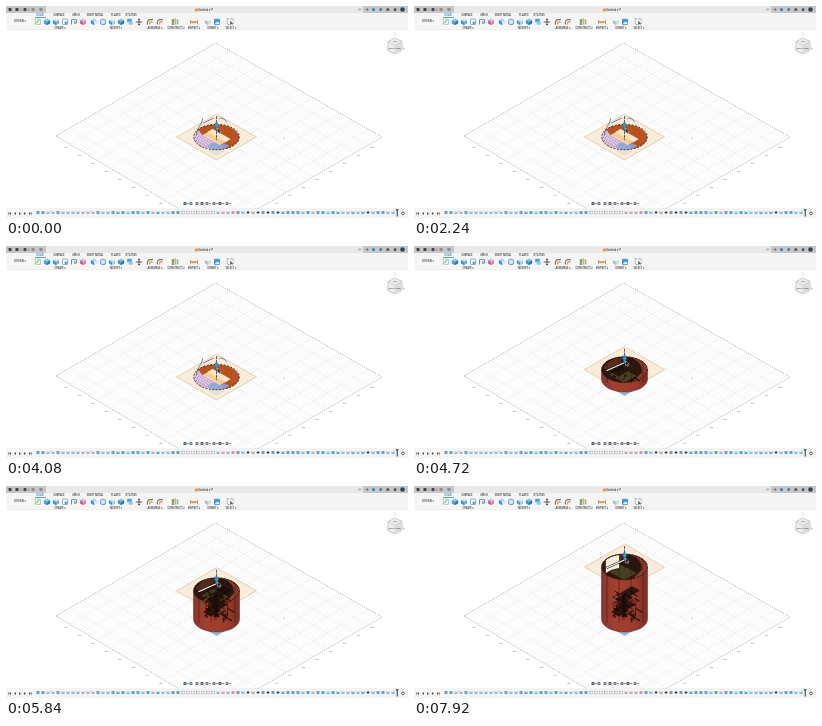
An HTML page that plays this animation: 402x212 px, repeating every 8 s.

```html
<!DOCTYPE html>
<html lang="en">
<head>
<meta charset="utf-8">
<title>Section view</title>
<style>
html, body { margin: 0; width: 100%; height: 100%; overflow: hidden; background: #fff; }
svg { display: block; width: 100vw; height: 100vh; }
text { font-family: "Open Sans", Inter, sans-serif; font-size: 2.6px; font-weight: 600; fill: #333; text-anchor: middle; }
#grid text { font-size: 2.2px; fill: #777; }
</style>
</head>
<body>
<svg id="stage" viewBox="0 0 402 212">
  <defs>
    <clipPath id="view"><rect y="24" width="402" height="179"/></clipPath>
    <clipPath id="shell"><path id="shellPath"/></clipPath>
    <clipPath id="disc"><ellipse rx="22.8" ry="12.8"/></clipPath>
    <linearGradient id="wall">
      <stop offset="0" stop-color="#87382e"/><stop offset=".3" stop-color="#a3402f"/>
      <stop offset=".72" stop-color="#9b3b2b"/><stop offset="1" stop-color="#7d2f25"/>
    </linearGradient>
    <pattern id="dots" width="2.4" height="2.4" patternUnits="userSpaceOnUse" patternTransform="rotate(30)">
      <rect width="2.4" height="2.4" fill="#e6cbe6"/><circle cx="1" cy="1" r=".6" fill="#8567a8"/>
    </pattern>
  </defs>
  <g id="grid" clip-path="url(#view)"></g>
  <g id="model">
    <path d="M203 145l7.5-4.3 7.5 4.3-7.5 4.4z" fill="#8fb5df" stroke="#5c8fca" stroke-width=".5"/>
    <path class="lift" d="M-40 0L0-23 40 0 0 23z" fill="#fbead4" fill-opacity=".82" stroke="#cfae7d" stroke-width=".5"/>
    <g id="body">
      <path id="side" fill="url(#wall)" stroke="#5c211b" stroke-width=".5"/>
      <g class="lift" clip-path="url(#disc)">
        <path d="M-23-14H23V14H-23z" fill="#2b1610"/>
        <path d="M-4-14C11-13 19-6 17 3L8 12 23 14V-14z" fill="#8b3a25"/>
        <path d="M-15 5L-3-2 12 6 0 13z" fill="#46401f"/>
        <path d="M-21-2C-17-9-9-12-3-12.5V-6L-15 1z" fill="#5a2a1a"/>
      </g>
      <g id="parts" clip-path="url(#shell)"></g>
      <path class="lift" id="slot" stroke="#2a1611" stroke-width=".7" fill="#fbeedd"/>
    </g>
    <g class="lift" id="floor">
      <g clip-path="url(#disc)">
        <path d="M-23-13H23V13H-23z" fill="url(#dots)"/>
        <path d="M-19-8C-8-15 18-15 23 0 23 6 17 12 10 13L5 8 14 2-4-8-14-2z" fill="#b9521f"/>
        <path d="M-9 9L1 3 13 9 1 16z" fill="#86a5d6" opacity=".85"/>
        <path d="M-14-2L-4-8 14 2 4 8z" fill="#f5cd94" stroke="#7b4a22" stroke-width=".4"/>
        <path d="M-9-5L-4-8 14 2 9 5z" fill="#fae6c6"/>
        <path d="M-14-2L-3 4 4 8" fill="none" stroke="#fff" stroke-width=".8"/>
        <g id="inner">
          <path d="M-14-9C-4-12 17-10 19 2L14 7C15-1 6-7-14-9z" fill="#7c3019"/>
          <path d="M-10-7C4-8 14-4 15 3" fill="none" stroke="#e8c7a1" stroke-width="1.2"/>
          <path d="M-11 8L1 1 14 8 2 15z" fill="#8688c4" opacity=".6"/>
        </g>
      </g>
      <path d="M-14-19C-14-13-20-9-20-2M-13-14L-3-19M3-19C7-19 9-17 10-15" fill="none" stroke="#343052" stroke-width=".6"/>
    </g>
    <g class="lift">
      <ellipse id="rim" rx="22.7" ry="12.7" fill="none" stroke="#1d1618" stroke-width=".9" stroke-dasharray="1.8 1.6"/>
      <g id="arm">
        <path d="M-18 1L2-8" stroke="#191313" stroke-width="2.2"/>
        <path d="M-18 1L2-8" stroke="#fff" stroke-width="1.1"/>
      </g>
      <path d="M0-21V3" stroke="#222" stroke-width=".7" stroke-dasharray="3 .8"/>
      <path d="M0-16L2.4-10.5H1V-7H-1V-10.5H-2.4z" fill="#328fd2" stroke="#17629c" stroke-width=".3"/>
      <circle cx=".8" cy="-11.5" r="1" fill="#55aa79"/>
      <path d="M1-9V-4L2.2-5 3-3.2 3.9-3.6 3.1-5.3H4.7z" fill="#111" stroke="#fff" stroke-width=".4"/>
    </g>
  </g>
  <g id="ui"></g>
</svg>
<script>
const $ = id => document.getElementById(id);
const add = (parent, tag, attrs, text) => {
  const el = document.createElementNS("http://www.w3.org/2000/svg", tag);
  for (const k in attrs) el.setAttribute(k, attrs[k]);
  if (text) el.textContent = text;
  return parent.appendChild(el);
};
let seed = 17;
const rnd = () => (seed = seed * 16807 % 2147483647) / 2147483647;
const ui = $("ui"), grid = $("grid"), inside = $("parts");
const box = (x, y, width, height, fill, more) => add(ui, "rect", { x, y, width, height, fill, ...more });
const path = (d, stroke, width = .6, fill = "none") => add(ui, "path", { d, stroke, "stroke-width": width, fill });
const shape = (d, fill) => add(ui, "path", { d, fill });
const label = (x, y, s, style = "") => add(ui, "text", { x, y, style }, s);

// Ground grid
const L = [50, 130], T = [210, 37], R = [376, 131], B = [212, 226];
const mix = (a, b, k) => [a[0] + (b[0] - a[0]) * k, a[1] + (b[1] - a[1]) * k];
const rule = (a, b, stroke, width, dash) =>
  add(grid, "path", { d: `M${a}L${b}`, stroke, "stroke-width": width, "stroke-dasharray": dash });
for (const major of [false, true])
  for (let i = 0; i <= 60; i++) {
    if ((i % 5 === 0) !== major) continue;
    const k = i / 60;
    const style = i % 60 === 0 ? ["#777", .55, "1.3 1.2"] : major ? ["#d4d4d4", .45, "1.4 .6"] : ["#f1f1f1", .35, "none"];
    rule(mix(L, T, k), mix(B, R, k), ...style);
    rule(mix(L, B, k), mix(T, R, k), ...style);
  }
for (let i = 1; i < 10; i++) {
  const a = mix(L, B, i / 12), b = mix(R, B, i / 12), n = String(500 - i * 50);
  add(grid, "text", { x: a[0] - 3.5, y: a[1] + 3.5 }, n);
  add(grid, "text", { x: b[0] + 3.5, y: b[1] + 3.5 }, n);
}
add(grid, "circle", { cx: 278.3, cy: 131.8, r: .6, fill: "#999" });

// Title bar
box(0, 0, 402, 7, "#c6c6c6");
box(40, 0, 317, 7, "#e9e9e9");
[4, 11, 19, 27, 35].forEach((x, i) => box(x - 1.5, 2, 3, 3, i < 3 ? "#444" : "#8c8c8c", { rx: .5 }));
path("M14 3.6h1.4M22 3.6h1.4", "#555", .7);
box(189, 2.4, 2.8, 2.8, "#ef8a31", { rx: .5 });
label(199.5, 4.9, "Untitled v1*");
path("M353 2.6l1.8 1.8m0-1.8l-1.8 1.8M359.7 3.5h3M361.2 2v3", "#444", .5);
["#2487c9", "#4c7fa5", "#555", "#555"].forEach((c, i) => add(ui, "circle", { cx: 367.5 + i * 7.2, cy: 3.5, r: 1.5, fill: c }));
add(ui, "circle", { cx: 396.5, cy: 3.5, r: 2.3, fill: "#34445c" });

// Toolbar
box(0, 7, 402, 17, "#f5f5f5");
box(0, 23.8, 402, .3, "#dcdcdc");
box(2.5, 9.5, 23.5, 11, "#f8f8f8", { stroke: "#e6e6e6", "stroke-width": .4 });
label(14, 16, "DESIGN ▾");
[[34, "SOLID"], [53, "SURFACE"], [70, "MESH"], [89, "SHEET METAL"], [110, "PLASTIC"], [125, "UTILITIES"]]
  .forEach(([x, s], i) => label(x, 10.2, s, i ? "" : "fill:#0a7fc2"));
box(29, 11, 11, .7, "#1187c9");
[[54, "CREATE ▾"], [110, "MODIFY ▾"], [149, "ASSEMBLE ▾"], [170, "CONSTRUCT ▾"], [188, "INSPECT ▾"], [207, "INSERT ▾"], [225, "SELECT ▾"]]
  .forEach(([x, s]) => label(x, 22.5, s));

const cube = (x, top, left, right) => {
  shape(`M${x} 12.6l3.1 1.5-3.1 1.6-3.1-1.6z`, top);
  shape(`M${x - 3.1} 14.1l3.1 1.6v3.5l-3.1-1.6z`, left);
  shape(`M${x + 3.1} 14.1l-3.1 1.6v3.5l3.1-1.6z`, right);
};
const frame = (x, fill, stroke) => box(x - 2.6, 13.2, 5.2, 5.2, fill, { stroke, "stroke-width": .6, rx: .4 });
const bend = x => {
  path(`M${x - 2.6} 18.6v-2q0-3 3-3h2.4`, "#777", 1.2);
  path(`M${x - .4} 18.6v-1.5q0-1.2 1.2-1.2h2`, "#e3933f", 1.2);
};
frame(32, "#fff", "#7fa892");
path("M30 17.5l3-3.5", "#3f9b6c", .9);
cube(41, "#8cc8ec", "#4a9fd8", "#2c7fb8");
cube(50, "#cfe6f4", "#3f97d3", "#6bb1de");
frame(59, "#fff", "#667c8e");
box(58.5, 15.5, 3, 3, "#58a8dc");
path("M65.5 18.5v-4.8h5v3.4h-2.6", "#5a7184", .8);
box(67.8, 15.3, 2, 2, "#6cb3df");
cube(77, "#e7b4e2", "#b765c4", "#e08d95");
cube(88, "#a8d5ef", "#3c95d2", "#dbe6ec");
add(ui, "circle", { cx: 97, cy: 16, r: 2.8, fill: "#d4e7f3", stroke: "#4a7fa4", "stroke-width": .7 });
cube(106, "#dfe9ef", "#4d9fd5", "#a9cde4");
cube(115, "#89c5ea", "#3b96d2", "#2d7fb8");
box(121.2, 12.8, 4.6, 3.6, "#4ba0d8");
box(122.8, 15, 3.8, 3.6, "#8cc3e6");
path("M133 12.8v6.4M129.8 16h6.4M132.1 13.8l.9-1 .9 1M132.1 18.2l.9 1 .9-1", "#222", .7);
bend(144);
bend(154);
box(165.8, 13, 2.2, 6, "#6eae72");
box(168.6, 12.4, 1.6, 6.2, "#e3a157");
box(170.8, 13.4, 1.6, 5, "#9fb4a0");
box(184.5, 15.2, 7, 2, "#e69a48");
path("M184.5 13.6v4.8M191.5 13.6v4.8", "#555", .4);
cube(202, "#eef0f2", "#b6bec4", "#d5dade");
frame(211, "#3b9bdb", "#2c7fb8");
shape("M208.8 18l2-2.6 1.2 1.2 1-1 .6 2.4z", "#dff0fb");
add(ui, "rect", { x: 221.2, y: 12.8, width: 6, height: 5.6, fill: "none", stroke: "#4d6c85", "stroke-width": .6, "stroke-dasharray": "1.2 .8" });
shape("M224.4 15v3.8l1-1 1.7.1z", "#333");

// View cube
path("M382 35.5L389 32l7 3.5v8.5l-7 3.7-7-3.7z", "#999", .5, "#ededed");
path("M382 35.5l7 3.7 7-3.7M389 39.2v8.5", "#aaa", .4);
shape("M396 35.5l-7 3.7v8.5l7-3.7z", "#dcdcdc");
add(ui, "path", { d: "M380 41C380 50 398 50 398 41", fill: "none", stroke: "#ddd", "stroke-width": .6 });
label(389, 36.4, "TOP", "font-size:2px");
label(385.6, 42.6, "FRONT", "font-size:1.8px");
label(392.5, 42.6, "RIGHT", "font-size:1.8px");
path("M389 26.2v3.5M396.8 42.5h2.2", "#aaa", .5);

// Navigation bar
[179, 185, 191, 196, 201, 208, 214, 221].forEach((x, i) => {
  box(x - 1.5, 196, 3, 3, i % 3 ? "#53698f" : "#33435f", { rx: .9 });
  box(x - .6, 196.9, 1.2, 1.2, "#c4d2e6");
  if (i === 0 || i > 3) shape(`M${x + 2.2} 197.1h1.8l-.9 1.1z`, "#333");
});

// Timeline
box(0, 202.8, 402, 9.2, "#f4f4f4");
box(0, 202.6, 402, .3, "#dcdcdc");
[4, 9, 14, 19, 24].forEach((x, i) => {
  const s = i < 2 ? -1 : 1;
  shape(`M${x - s} 205.9l${s * 2} 1.5${-s * 2} 1.5z`.replace(" 1.5" + -s * 2, ` 1.5 ${-s * 2}`), "#555");
  if (i % 4 === 0) path(`M${x + s * 1.3} 205.9v3`, "#555", .5);
});
for (let i = 0; i < 72; i++) {
  const x = 32 + i * 5, r = rnd();
  if (i > 41 && i < 50 && i % 2 === 0 || i === 66) {
    path(`M${x - 1.5} 206.5h3M${x} 205v3`, "#222", .8);
  } else if (i > 28 && i < 36) {
    box(x - 1.4, 205.1, 2.8, 2.8, "#f2f2f2", { stroke: "#98a4ad", "stroke-width": .5 });
  } else {
    const fill = i === 37 || i === 39 ? "#d792b0" : r > .75 ? "#a4b0b9" : r < .45 ? "#5aa5d8" : "#86b8dc";
    box(x - 1.5, 205, 3, 3, fill, { rx: .5 });
    if (r > .3) box(x - 1, 205.1, 2.4, 1, "#e6eff5");
  }
}
box(390.7, 203.5, 1, 7, "#26384a");
shape("M389.5 203.2h3.4l-1.7 1.8z", "#26384a");
add(ui, "circle", { cx: 397, cy: 207.4, r: 1.4, fill: "none", stroke: "#555", "stroke-width": .9 });

// Machinery inside the shell, each piece at its own height
const parts = [];
const piece = (z, attrs) => parts.push({ z, el: add(inside, "path", attrs) });
for (let i = 0; i < 80; i++) {
  const z = 2 + 25 * rnd(), x = 198 + 24 * rnd(), y = 131 - z + 13 * (rnd() - .3);
  const len = 3 + 6 * rnd(), dir = i % 4;
  const dx = dir === 3 ? 0 : dir === 1 ? -len * .8 : len * .8, dy = dir === 3 ? len * .7 : len * .45;
  const stroke = i % 9 === 0 ? "#59622c" : i % 7 === 0 ? "#6b2119" : "#1c0d0a";
  piece(z, { d: `M${x} ${y}l${dx} ${dy}`, stroke, "stroke-width": .6 + rnd(), opacity: .85 });
}
[[197, 126, 5], [204, 120, 11], [201, 113, 18], [208, 106, 26]].forEach(([x, y, z]) =>
  piece(z, { d: `M${x} ${y}l10-6 8 4.5-10 6z`, fill: "#1a0c09", opacity: .8 }));
piece(14, { d: "M208 108l4-2v24l-4 2z", fill: "#180b08", opacity: .8 });
for (const x of [193, 205, 217, 229])
  add(inside, "path", { d: `M${x} 70V137`, stroke: "#2a110c", "stroke-width": .6, opacity: .75 });

const keys = [[0, 0], [4240, 0], [4480, 3], [5200, 16], [5920, 27.5], [6240, 30], [6400, 31], [7120, 31], [7920, 50], [8000, 50]];
const heightAt = t => {
  const i = keys.findIndex(k => k[0] > t), [t0, a] = keys[i - 1], [t1, b] = keys[i];
  return a + (b - a) * (t - t0) / (t1 - t0);
};
const lifts = document.querySelectorAll(".lift");
const show = (el, on) => el.setAttribute("visibility", on ? "visible" : "hidden");

function draw(time) {
  const t = Math.floor(time % 8000 / 80) * 80, h = heightAt(t), c = 131 - h;
  const base = 131 + Math.min(2, h / 3), gap = Math.max(0, h - 36);
  const outline = `M187.5 ${c}A23 13 0 0 1 233.5 ${c}V${base}A23 13 0 0 1 187.5 ${base}Z`;
  lifts.forEach(el => el.setAttribute("transform", `translate(210.5 ${c})`));
  $("side").setAttribute("d", outline);
  $("shellPath").setAttribute("d", outline);
  // the back wall is open above a fixed height
  $("slot").setAttribute("d", `M-19-7.3A23 13 0 0 1-5-12.7v${gap}A23 13 0 0 0-19 ${gap - 7.3}z`);
  show($("slot"), gap > 0);
  parts.forEach(p => show(p.el, p.z < h));
  show($("body"), h > 0);
  $("floor").setAttribute("opacity", Math.max(0, Math.min(1, 1 - (h - 1) / 5)));
  $("arm").setAttribute("opacity", Math.min(1, h / 8));
  show($("inner"), t >= 960 && t < 2000);
}

const start = performance.now();
function tick(now) {
  draw(Math.max(0, now - start));
  requestAnimationFrame(tick);
}
tick(start);
</script>
</body>
</html>
```
